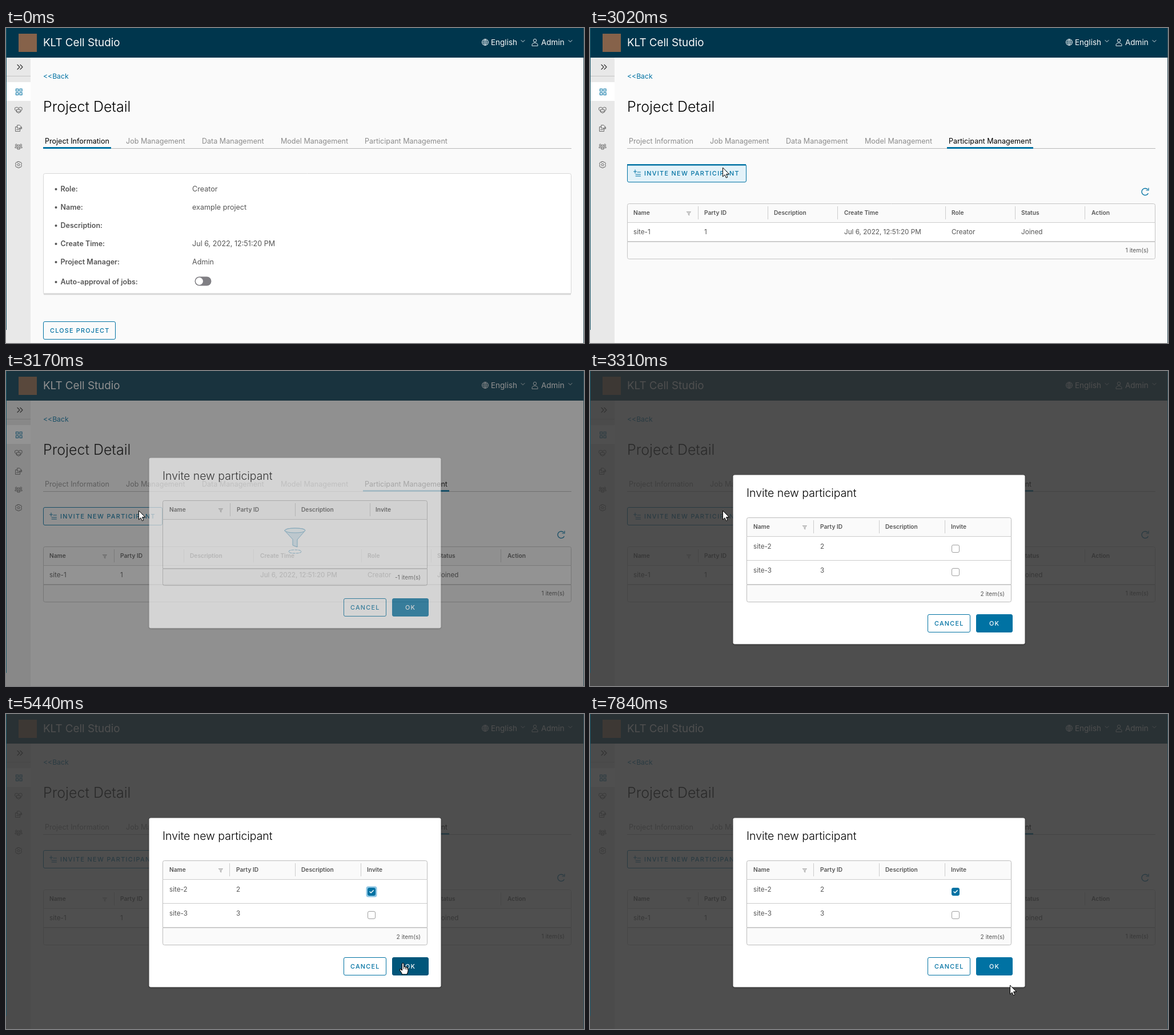
Animation of 1012x553 px, one loop 8000 ms. Source, as an HTML page with a canvas:

```html
<!DOCTYPE html>
<html lang="en">
<head>
<meta charset="utf-8">
<title>Project Detail</title>
<style>
html, body { margin: 0; width: 100%; height: 100%; overflow: hidden; background: #fafafa; }
canvas { display: block; width: 1012px; height: 553px; }
</style>
</head>
<body>
<canvas id="stage" width="1012" height="553"></canvas>
<script>
const W = 1012, H = 553, LOOP = 8000, STEP = 70;
const BLUE = '#0072a3', GREY = '#8c8c8c', INK = '#565656', LINE = '#cccccc';
const main = document.getElementById('stage').getContext('2d');
const layer = Object.assign(document.createElement('canvas'), { width: W, height: H }).getContext('2d');
let c = main;

// Drawing helpers
function fill(x, y, w, h, color) {
  c.fillStyle = color;
  c.fillRect(x, y, w, h);
}

// y is the middle of the capital letters
function text(s, x, y, size, color, weight = 400, align = 'left', spacing = 0) {
  c.font = `${weight} ${size}px Inter, "Open Sans", sans-serif`;
  c.letterSpacing = spacing + 'px';
  c.textAlign = align;
  c.fillStyle = color;
  c.fillText(s, x, y + size * 0.364);
}

function box(x, y, w, h, r, bg, border, lw = 1) {
  c.beginPath();
  c.roundRect(x + 0.5, y + 0.5, w - 1, h - 1, r);
  if (bg) { c.fillStyle = bg; c.fill(); }
  if (border) { c.strokeStyle = border; c.lineWidth = lw; c.stroke(); }
}

function path(d, x, y, color, lw = 1, bg) {
  const p = new Path2D(d);
  c.save();
  c.translate(x, y);
  if (bg) { c.fillStyle = bg; c.fill(p); }
  c.strokeStyle = color;
  c.lineWidth = lw;
  c.lineJoin = c.lineCap = 'round';
  c.stroke(p);
  c.restore();
}

function arc(x, y, r, a, b, color, lw) {
  c.beginPath();
  c.arc(x, y, r, a, b);
  c.strokeStyle = color;
  c.lineWidth = lw;
  c.stroke();
}

function button(label, x, y, w, h, bg, color, labelX) {
  box(x, y, w, h, 2.5, bg, bg && color === '#fff' ? bg : BLUE);
  text(label, labelX, y + h / 2 + 0.5, 10.8, color, 500, 'left', 1.25);
}

const funnel = (x, y) => path('M-3.5 -3H3.5L.8 .5V3.5L-.8 2.5V.5Z', x, y, '#a6a6a6', 0.8, '#d0d0d0');

function refresh(y) {
  arc(972, y, 6, 0.45, 5.6, BLUE, 1.3);
  path('M6 -6.5V-2.5H2', 972, y, BLUE, 1.2);
}

// Cursor
const moves = [
  [530, 1230, 713, 201],
  [2120, 2820, 232, 245],
  [3580, 4210, 640, 310],
  [4740, 5440, 695, 437],
  [7220, 7360, 718, 456],
  [7560, 7840, 735, 476]
];

function cursorAt(t) {
  let x = 936, y = 531;
  for (const [t0, t1, tx, ty] of moves) {
    if (t < t0) break;
    const n = Math.round((t1 - t0) / STEP) + 1;
    const p = Math.min(n, Math.floor((t - t0) / STEP) + 1) / n;
    const e = p * p * (3 - 2 * p);
    x += (tx - x) * e;
    y += (ty - y) * e;
  }
  return { x: Math.round(x), y: Math.round(y) };
}

const inside = (p, x, y, w, h) => p.x >= x && p.x < x + w && p.y >= y && p.y < y + h;

function drawCursor(p, hand) {
  if (hand) {
    path('M-1.5 1.5Q0 -1 1.5 1.5V7Q3 5.5 4.5 7.5Q6 6.5 7 8.5Q9 7.5 9 10V14Q8.5 17 7 20H-1.5' +
      'Q-2.5 16.5 -5.5 13Q-6.5 10.5 -4 11L-1.5 13Z', p.x, p.y, '#000', 1.1, '#fff');
    path('M1.5 7V10.5M4.5 8V11M7 9V11.5', p.x, p.y, '#000', 0.9);
  } else {
    path('M.5 .5V16L4 12.7L6.4 18L8.8 17L6.5 11.6H11.3Z', p.x, p.y, '#000', 1, '#fff');
  }
}

// Page
function sidebar() {
  fill(0, 52, 43, H - 52, '#e8e8e8');
  fill(0, 84, 43, 1, '#c4c4c4');
  fill(0, 95, 43, 33, '#fff');
  path('M-4 -4L0 0L-4 4M1 -4L5 0L1 4', 24, 68.5, '#333', 1.2);
  for (const [x, y] of [[17, 106.5], [23.5, 106.5], [17, 113], [23.5, 113]]) box(x, y, 5, 5, 0, null, BLUE, 1.1);
  const ink = '#6a6a6a';
  path('M-6 -4L-3 -5L0 -3.5L3 -5L6 -4V0L4 1V3L0 5.5L-4 3V1L-6 0ZM-3 -1H3V3H-3ZM0 -3V-1', 22, 144, ink);
  path('M-2 -5.5H2L4 -3.5V0H-2ZM-2 -2.5H-5.5V5.5H2.5V0M1 1H5.5V-2H4M-3.5 2.5H.5', 22, 176, ink);
  for (const x of [-4, 0, 4]) {
    const y = x ? 205.5 : 206.5;
    arc(22 + x, y, 1.6, 0, 7, ink, 1);
    path('M-2.2 4.5Q-2.2 2 0 2Q2.2 2 2.2 4.5Z', 22 + x, y + (x ? 0 : 1.5), ink);
  }
  arc(22, 240, 2, 0, 7, ink, 1);
  path('M-1.5 -5.5H1.5L2 -4L4 -4.5L5.5 -2L4.5 0L5.5 2L4 4.5L2 4L1.5 5.5H-1.5L-2 4L-4 4.5L-5.5 2L-4.5 0L-5.5 -2L-4 -4.5L-2 -4Z', 22, 240, ink);
}

function header() {
  fill(0, 0, W, 52, '#00364d');
  fill(22, 10, 32, 32, '#86624a');
  text('KLT Cell Studio', 65, 25.5, 18.8, '#fafafa');
  arc(839, 25, 5.5, 0, 7, '#dfe6ea', 1);
  path('M-5.5 0H5.5M0 -5.5V5.5M0 -5.5Q-5 0 0 5.5Q5 0 0 -5.5M-4.5 -3H4.5M-4.5 3H4.5', 839, 25, '#dfe6ea', 0.8);
  text('English', 849, 25, 13.5, '#fafafa');
  arc(926, 22, 2.7, 0, 7, '#dfe6ea', 1);
  path('M-5 5V3Q-4 0 0 0Q4 0 5 3V5Z', 926, 26, '#dfe6ea');
  text('Admin', 937, 25, 13.5, '#fafafa');
  for (const x of [905, 988]) path('M-3 -1.5L0 1.5L3 -1.5', x, 23, '#dfe6ea');
}

const tabs = [
  ['Project Information', 68, 116], ['Job Management', 210, 107], ['Data Management', 343, 113],
  ['Model Management', 481, 121], ['Participant Management', 628, 148]
];

function tabBar(active, hovered, focused) {
  fill(65, 211, 925, 1, '#b8b8b8');
  tabs.forEach(([label, x, w], i) => {
    const on = i === active || i === hovered;
    text(label, x, 198, 12.55, on ? '#000' : GREY);
    if (on) fill(x - 3, 209, w + 3, 3, BLUE);
  });
  if (focused) {
    c.setLineDash([1, 1]);
    box(623, 180, 154, 33, 0, null, '#222');
    c.setLineDash([]);
  }
}

function infoCard() {
  box(65, 255, 925, 213, 3, '#fff', '#d7d7d7');
  fill(66, 465.5, 923, 3, '#d7d7d7');
  const rows = [['Role:', 'Creator'], ['Name:', 'example project'], ['Description:', ''],
    ['Create Time:', 'Jul 6, 2022, 12:51:20 PM'], ['Project Manager:', 'Admin'], ['Auto-approval of jobs:', '']];
  rows.forEach(([name, value], i) => {
    const y = i < 5 ? 282 + i * 32 : 445;
    c.beginPath();
    c.arc(87.5, y + 1, 2, 0, 7);
    c.fillStyle = INK;
    c.fill();
    text(name, 95.5, y, 12.5, INK, 600);
    text(value, 326, y, 12.6, INK);
  });
  box(330, 436, 30, 17, 8, '#807f84');
  c.beginPath();
  c.arc(338.5, 444.5, 6.5, 0, 7);
  c.fillStyle = '#fff';
  c.fill();
  button('CLOSE PROJECT', 65, 515, 127, 32, null, BLUE, 77);
}

// cols: [label, text x]; seps: divider positions
function gridHead(x, y, w, h, cols, seps, filterX) {
  cols.forEach(([label, cx]) => text(label, cx, y + 16.5, 10.2, INK, 600));
  seps.forEach(sx => fill(sx, y + 5, 1, h - 10, LINE));
  funnel(filterX, y + 17.5);
  fill(x, y + h, w, 1, LINE);
}

function loadingGrid(t) {
  refresh(266.5);
  c.globalAlpha = 0.5;
  box(65, 287, 925, 65, 3, '#fdfdfd', LINE);
  gridHead(65, 287, 925, 33, [['Name', 76], ['Party ID', 234], ['Description', 387],
    ['Create Time', 556], ['Role', 726], ['Status', 858]], [222, 375, 545, 715, 847], 206);
  fill(65, 320, 925, 2, LINE);
  text('0 item(s)', 978, 337.5, 10.2, INK, 400, 'right');
  c.globalAlpha = 1;
  const a = 2.4 + (t - 1710) / 1000 * Math.PI * 2;
  arc(527, 319.5, 14.5, 0, 7, '#dcdcdc', 2.8);
  arc(527, 319.5, 14.5, a, a + 2.35, '#1a72b8', 2.8);
}

function memberGrid(hover, pressed) {
  box(65, 239, 209, 32, 2.5, hover ? '#e3f2f9' : null, BLUE);
  if (pressed) fill(65, 239, 208, 2.5, BLUE);
  path('M-4 -6V0M-6.5 -3H-1.5M0 -2H5.5M-3 2H5.5M-3 5H5.5', 83, 255, BLUE, 1);
  text('INVITE NEW PARTICIPANT', 95, 255.5, 10.8, BLUE, 500, 'left', 1.35);
  refresh(287.5);
  box(65, 308, 925, 98, 3, '#fafafa', '#c4c4c4');
  fill(66, 342, 923, 32, '#fff');
  gridHead(65, 308, 925, 33, [['Name', 76], ['Party ID', 200], ['Description', 322], ['Create Time', 445],
    ['Role', 633], ['Status', 755], ['Action', 878]], [189, 311, 433, 622, 744, 866], 173);
  for (const [s, x] of [['site-1', 76], ['1', 200], ['Jul 6, 2022, 12:51:20 PM', 445], ['Creator', 633], ['Joined', 755]])
    text(s, x, 358, 11.7, INK);
  fill(65, 374, 925, 2, LINE);
  text('1 item(s)', 978, 390.5, 10.2, INK, 400, 'right');
}

// Dialog
function checkbox(y, checked, focused) {
  if (focused) box(630, y - 10, 20, 20, 4, '#8fc6e4');
  box(633, y - 7, 14, 14, 2.5, checked ? BLUE : '#fff', checked ? BLUE : '#a0a0a0');
  if (checked) path('M-3 0L-1 2L3.2 -2.2', 640, y, '#fff', 1.5);
}

function dialog(t, p) {
  const ready = t >= 3310, d = ready ? 0 : 1;
  c.save();
  c.shadowColor = 'rgba(0,0,0,.4)';
  c.shadowBlur = 3;
  c.shadowOffsetY = 1;
  box(250, 182 - d, 512, 298 + 2 * d, 3, '#fff');
  c.restore();
  text('Invite new participant', 274, 214 - d, 19.4, '#000', 300);
  box(274, 257 - d, 464, 149 + d, 3, '#fafafa', '#bcbcbc');
  fill(275, 291, 462, 84, '#fff');
  const head = ready ? [['Name', 286], ['Party ID', 403], ['Description', 517], ['Invite', 632]]
    : [['Name', 286], ['Party ID', 404], ['Description', 517], ['Invite', 647]];
  gridHead(274, 257 - d, 464, 33, head, ready ? [391, 506, 621] : [392, 506, 637], 376);
  if (ready) {
    [['site-2', '2'], ['site-3', '3']].forEach(([name, id], i) => {
      const y = 291 + i * 42;
      if (inside(pos, 275, y, 462, 42)) fill(275, y, 462, 41, '#e8e8e8');
      text(name, 286, y + 17, 11.7, INK);
      text(id, 403, y + 17, 11.7, INK);
      fill(275, y + 41, 462, 1, LINE);
    });
    checkbox(312, t >= 4470, t >= 4470 && t < 6230);
    checkbox(353, false, false);
  } else {
    path('M-18 -12Q-18 -16 0 -16Q18 -16 18 -12L4 4V17L-4 14V4Z', 506, 321, '#79b5d3', 1, '#d9ebf4');
    path('M-18 -12Q-16 -8 0 -8Q16 -8 18 -12Q16 -16 0 -16Q-16 -16 -18 -12Z', 506, 321, '#79b5d3', 1, '#eef7fb');
    c.setLineDash([4, 2]);
    path('M-11 0Q-11 -3 0 -3Q11 -3 11 0Q11 3 0 3Q-11 3 -11 0Z', 506, 346, '#79b5d3');
    c.setLineDash([]);
  }
  fill(274, 374 + d, 464, 2, LINE);
  text(ready ? '2 item(s)' : '-1 item(s)', 726, 391, 10.2, INK, 400, 'right');
  button('CANCEL', 591, 427 + d, 75, 32, null, BLUE, 603);
  button('OK', 676, 427 + d, 64, 32, overOk ? '#00567a' : BLUE, '#fff', 699);
  if (t >= 6230 && t < 6490) fill(676, 427, 64, 2, '#003d58');
}

let pos, overOk;

function draw(t) {
  c = main;
  pos = cursorAt(t);
  const open = t >= 3020;
  const overTab = t < 2820 && inside(pos, 625, 181, 152, 32);
  const overInvite = t >= 1850 && t < 3060 && inside(pos, 65, 239, 209, 32);
  const overBox = open && inside(pos, 630, 302, 20, 20);
  overOk = open && inside(pos, 676, 427, 64, 32);

  fill(0, 0, W, H, '#fafafa');
  header();
  sidebar();
  text('<<Back', 65, 84.5, 12.2, BLUE);
  text('Project Detail', 65, 138, 25, '#000', 300);
  const switched = t >= 1500;
  tabBar(switched ? 4 : 0, overTab ? 4 : -1, switched && t < 2950);
  if (!switched) infoCard();
  else if (t < 1850) loadingGrid(t);
  else memberGrid(overInvite, t >= 2950 && t < 3060);

  const held = t < 3310 ? 3030 + Math.floor((t - 3030) / STEP) * STEP : t;
  const k = Math.max(0, Math.min(1, (held - 3055) / 200));
  const p = k * k * (3 - 2 * k);
  if (p > 0) {
    fill(0, 0, W, H, `rgba(49,49,49,${0.85 * p})`);
    layer.clearRect(0, 0, W, H);
    c = layer;
    dialog(t, p);
    c = main;
    c.globalAlpha = p;
    c.drawImage(layer.canvas, 0, Math.round(-75 * (1 - p)));
    c.globalAlpha = 1;
  }
  fill(0, 0, 1, 530, '#1d5a6b');
  fill(W - 1, 0, 1, H, '#33505c');
  if (t >= 530) drawCursor(pos, overTab || (overInvite && t < 2950) || overBox || overOk);
}

const start = performance.now();
function tick() {
  draw((performance.now() - start) % LOOP);
  requestAnimationFrame(tick);
}
tick();
</script>
</body>
</html>
```
